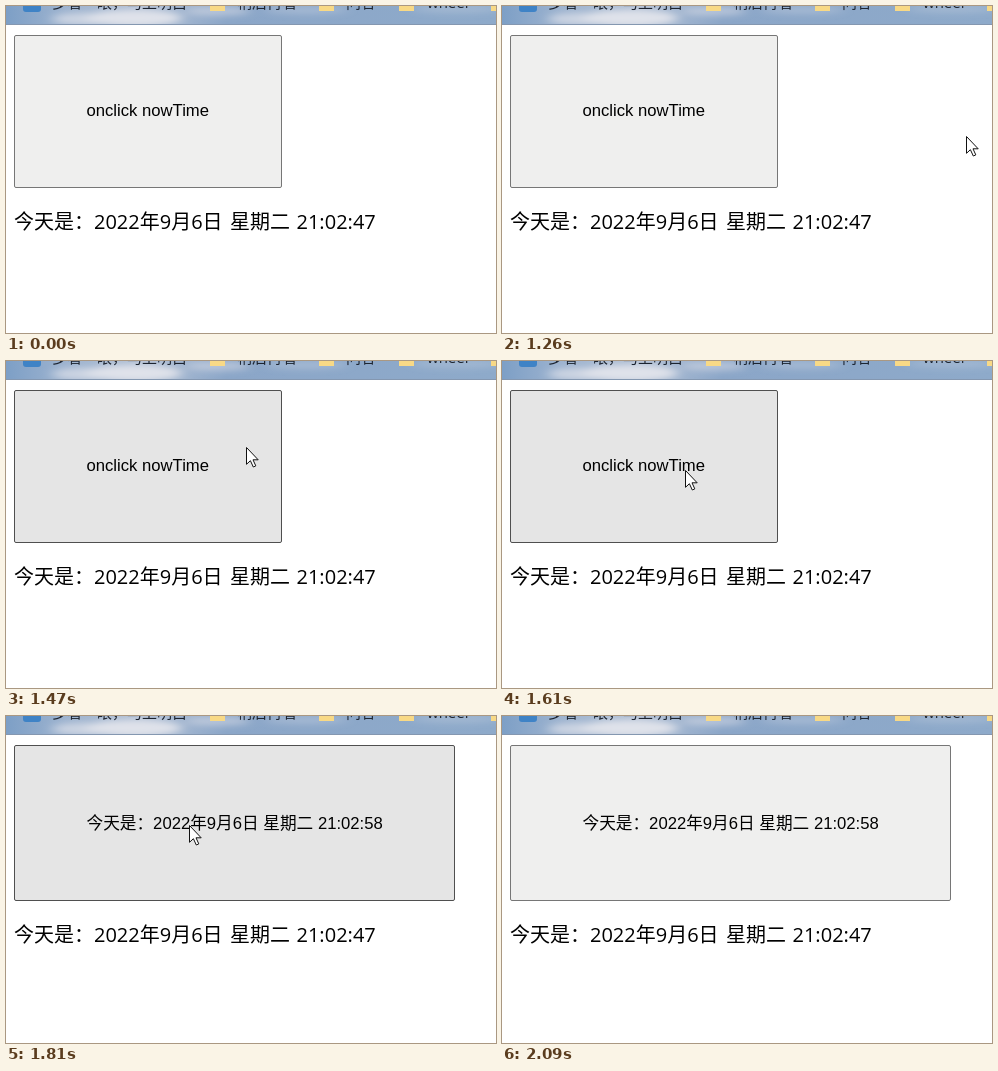
Recreate the animation shown at these times as an HTML page. Size 490 by 327 pixels, loop 3.76 s.

```html
<!DOCTYPE html>
<html lang="zh-CN">
<head>
<meta charset="utf-8">
<title>nowTime</title>
<style>
  html, body { margin: 0; width: 100%; height: 100%; overflow: hidden; background: #fff; }
  svg { display: block; width: 490px; height: 327px; }
  text { white-space: pre; fill: #000; }
  .bar text { font: 15px "Open Sans", "Noto Sans CJK SC", sans-serif; fill: #1c2430; }
  .label { font: 16.667px "Liberation Sans", "Noto Sans CJK SC", sans-serif; }
  .date { font: 20px "Open Sans", "Noto Sans CJK SC", sans-serif; }
</style>
</head>
<body>
<svg viewBox="0 0 490 327">
  <defs>
    <linearGradient id="sky">
      <stop offset="0" stop-color="#7d9fc6"/>
      <stop offset=".12" stop-color="#9db3cf"/>
      <stop offset=".28" stop-color="#b3c1d5"/>
      <stop offset=".45" stop-color="#8ba6c8"/>
      <stop offset="1" stop-color="#8eaaca"/>
    </linearGradient>
    <filter id="soft" x="-30%" y="-60%" width="160%" height="220%"><feGaussianBlur stdDeviation="6 3"/></filter>
    <clipPath id="barClip"><path d="M0 0h490v19H0z"/></clipPath>
    <g id="folder">
      <path d="M0-8h6l2 2h7V5H0z" fill="#e9bd55"/>
      <path d="M0-4h15V5H0z" fill="#f8d986"/>
    </g>
  </defs>

  <g class="bar" clip-path="url(#barClip)">
    <path d="M0 0h490v19H0z" fill="url(#sky)"/>
    <g filter="url(#soft)" fill="#dfe2ea">
      <ellipse cx="76" cy="13" rx="30" ry="6" opacity=".7"/>
      <ellipse cx="128" cy="12" rx="48" ry="8"/>
      <ellipse cx="212" cy="5" rx="32" ry="5" opacity=".5"/>
      <ellipse cx="300" cy="4" rx="42" ry="4" opacity=".3"/>
      <ellipse cx="450" cy="3" rx="45" ry="4" opacity=".25"/>
    </g>
    <path d="M0 18h490v1H0z" fill="#8497b0"/>
    <rect x="17" y="-12" width="18" height="18" rx="3" fill="#3f83c6"/>
    <use href="#folder" x="204"/><use href="#folder" x="313"/>
    <use href="#folder" x="393"/><use href="#folder" x="485"/>
    <text x="46" y="2">多看一眼，马上明白</text>
    <text x="231" y="2">稍后再看</text>
    <text x="340" y="2">问答</text>
    <text x="421" y="2">wheel</text>
  </g>

  <rect id="button" x="8.5" y="29.5" rx="1.5"/>
  <text id="label" class="label" x="80.5"></text>
  <text id="date" class="date" y="223"><tspan x="8">今天是：</tspan><tspan x="88">2022年9月6日</tspan><tspan x="224">星期二</tspan><tspan x="290.5">21:02:47</tspan></text>

  <path id="cursor" d="M.5.5v16.8l3.9-3.6 2.9 6.3 2.5-1.1-2.8-6.1h5.2z" fill="#fff" stroke="#111"/>
  <circle id="press" cx="183" cy="109" r="15" fill="#ff0" fill-opacity=".47"/>
</svg>

<script>
const LOOP = 3760;
const LOOKS = {
  idle: ['#efefee', '#767676'],
  hover: ['#e5e5e5', '#4f4f4f'],
  active: ['#f5f5f5', '#8d8d8d']
};
// time, button look, cursor tip (absent when off stage)
const STEPS = [
  [0, 'idle'],
  [1060, 'idle', 489, 137],
  [1130, 'idle', 476, 132],
  [1260, 'idle', 464, 130],
  [1330, 'idle', 408, 113],
  [1400, 'idle', 316, 92],
  [1470, 'hover', 240, 86],
  [1540, 'hover', 196, 102],
  [1610, 'hover', 183, 109],
  [1680, 'active', 183, 109],
  [1810, 'hover', 183, 109],
  [1880, 'hover', 186, 128],
  [1950, 'idle', 200, 195],
  [2020, 'idle', 220, 278],
  [2090, 'idle']
];
const CLICKED = 1810;
const [button, label, date, press, cursor] =
  ['button', 'label', 'date', 'press', 'cursor'].map(id => document.getElementById(id));

function set(node, attrs) {
  for (const name in attrs) node.setAttribute(name, attrs[name]);
}

function draw(time) {
  const [, look, x, y] = STEPS.findLast(step => step[0] <= time);
  const clicked = time >= CLICKED;
  const [fill, stroke] = LOOKS[look];
  set(button, { width: clicked ? 440 : 267, height: clicked ? 155 : 152, fill, stroke });
  set(label, { y: clicked ? 113 : 110 });
  label.textContent = clicked ? '今天是：2022年9月6日 星期二 21:02:58' : 'onclick nowTime';
  set(date, { transform: `translate(0 ${clicked ? 3 : 0})` });
  set(press, { visibility: look === 'active' ? 'visible' : 'hidden' });
  set(cursor, {
    visibility: x === undefined ? 'hidden' : 'visible',
    transform: `translate(${x ?? 0} ${y ?? 0})`
  });
}

const start = performance.now();
function tick() {
  draw((performance.now() - start) % LOOP);
  requestAnimationFrame(tick);
}
tick();
</script>
</body>
</html>
```
